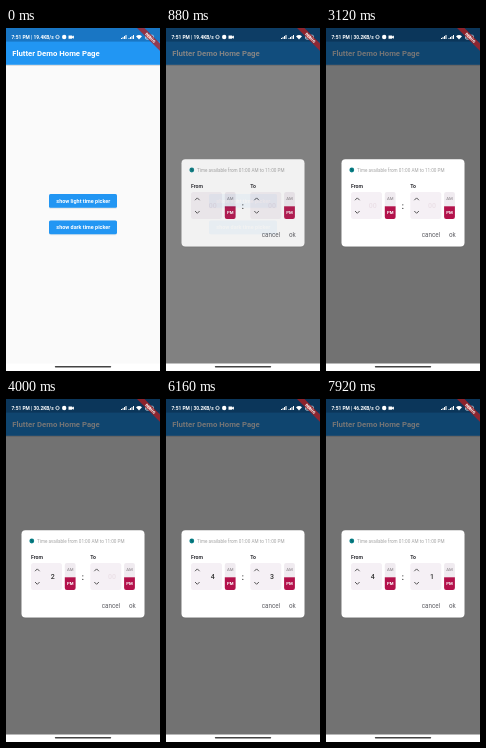
These frames come from a looping animation (154x343 px, 8000 ms). An HTML page:

```html
<!DOCTYPE html>
<html lang="en">
<head>
<meta charset="utf-8">
<title>Time picker demo</title>
<style>
  html, body { margin: 0; width: 100%; height: 100%; overflow: hidden; background: #fafafa; }
  svg { display: block; width: 100vw; height: 100vh; font-family: Roboto, "Noto Sans", sans-serif; }
  .status { fill: #fff; font-size: 4.85px; font-weight: 700; }
  .title { fill: #fff; font-size: 7.75px; font-weight: 700; }
  .button { fill: #2196f3; }
  .label { fill: #fff; font-size: 5.45px; font-weight: 700; text-anchor: middle; }
  .note { fill: #a3a3a3; font-size: 4.63px; }
  .head { fill: #303036; font-size: 5.2px; font-weight: 700; }
  .digit { fill: #333; font-size: 7px; font-weight: 500; text-anchor: middle; }
  .digit.hint { fill: #eadfe6; }
  .half { font-size: 4.3px; text-anchor: middle; }
  .action { fill: #606066; font-size: 6.3px; }
  .line { fill: none; stroke: #444; stroke-width: .9; }
  .banner { font-size: 3.9px; font-weight: 900; fill: #fff; text-anchor: middle; }
</style>
</head>
<body>
<svg viewBox="0 0 154 343" preserveAspectRatio="none">
  <defs>
    <linearGradient id="shade" x2="0" y2="1">
      <stop stop-color="#000" stop-opacity=".2"/>
      <stop offset="1" stop-color="#000" stop-opacity="0"/>
    </linearGradient>
    <filter id="lift" x="-20%" y="-40%" width="140%" height="200%">
      <feDropShadow dx="0" dy=".4" stdDeviation=".4" flood-opacity=".2"/>
    </filter>
    <clipPath id="column"><rect x="58.8" y="164" width="10.8" height="27" rx="2"/></clipPath>
    <g id="picker">
      <rect x="25" y="164" width="31" height="27" rx="2.5" fill="#f5f0f5"/>
      <path class="line" d="M29 172.2l2.3-2.3 2.3 2.3M29 183l2.3 2.3 2.3-2.3"/>
      <g clip-path="url(#column)">
        <rect x="58" y="164" width="12" height="15" fill="#f0ebf0"/>
        <rect x="58" y="178.3" width="12" height="13" fill="#b3124b"/>
      </g>
      <text class="half" x="64.2" y="172.2" fill="#8a858a">AM</text>
      <text class="half" x="64.2" y="186.4" fill="#fff" font-weight="700">PM</text>
    </g>
  </defs>

  <rect width="154" height="343" fill="#fafafa"/>
  <rect y="36.8" width="154" height="1.6" fill="url(#shade)"/>
  <rect width="154" height="36.8" fill="#2196f3"/>
  <rect width="154" height="13.6" fill="#1976c4"/>
  <text class="title" x="6.2" y="28.2">Flutter Demo Home Page</text>
  <g filter="url(#lift)">
    <rect class="button" x="43" y="166" width="68" height="13.8" rx="1.6"/>
    <rect class="button" x="43" y="192.4" width="68" height="13.8" rx="1.6"/>
  </g>
  <text class="label" x="77.3" y="174.8">show light time picker</text>
  <text class="label" x="77.3" y="201.2">show dark time picker</text>

  <rect id="barrier" width="154" height="336" opacity="0"/>

  <g id="dialog" opacity="0">
    <rect x="15.5" y="131.3" width="123" height="87.3" rx="4" fill="#fff" filter="url(#lift)"/>
    <circle cx="25.8" cy="142" r="2.4" fill="#087f86"/>
    <path d="M25.8 140.6V142.1l1 .7" fill="none" stroke="#034a50" stroke-width=".6"/>
    <text class="note" x="31" y="143.5">Time available from 01:00 AM to 11:00 PM</text>
    <text class="head" x="25" y="159.8">From</text>
    <text class="head" x="84.3" y="159.8">To</text>
    <use href="#picker"/>
    <use href="#picker" x="59.3"/>
    <text id="from" class="digit" x="46.7" y="180.1"></text>
    <text id="to" class="digit" x="106" y="180.1"></text>
    <circle cx="76.8" cy="176.8" r=".65" fill="#444"/>
    <circle cx="76.8" cy="180.4" r=".65" fill="#444"/>
    <text class="action" x="95.7" y="209.1">cancel</text>
    <text class="action" x="123" y="209.1">ok</text>
  </g>

  <g class="status">
    <text id="status" x="5.5" y="10.8"></text>
    <circle cx="51.5" cy="9" r="1.7" fill="none" stroke="#fff" stroke-width=".8"/>
    <circle cx="58.2" cy="9" r="2.2"/>
    <path d="M62.5 7.5h3.7v1l1.7-1v3.2l-1.7-1v1h-3.7z"/>
    <path d="M115 11v-1h1v1zM116.5 11v-2h1v2zM118 11V8h1v3zM119.5 11V7h1v4z"/>
    <path d="M122.5 11v-1h1v1zM124 11v-2h1v2zM125.5 11V8h1v3zM127 11V7h1v4z"/>
    <path d="M130 8.2q3-2.6 6 0L133 11.4z"/>
    <rect x="139.5" y="7.2" width="8" height="4" rx="1.2" fill="none" stroke="#fff" stroke-width=".6"/>
    <rect x="140.5" y="8.1" width="4.5" height="2.2" rx=".5"/>
  </g>

  <g transform="translate(154 0) rotate(45)">
    <rect x="-16" y="11" width="32" height="5.2" fill="#b71c1c" fill-opacity=".75"/>
    <text class="banner" y="15">DEBUG</text>
  </g>

  <rect y="335.5" width="154" height="7.5" fill="#fff"/>
  <rect x="48.8" y="338" width="56.4" height="1.5" rx=".75" fill="#444"/>
</svg>
<script>
  const LOOP = 8000, STEP = 80;
  const get = id => document.getElementById(id);

  // Each track is a list of [start time, value].
  const tracks = {
    fade: [[0, 0], [800, .45], [880, .9], [960, 1]],
    speed: [[0, '19.4'], [2480, '30.2'], [6960, '46.2']],
    from: [[0, '00'], [3440, '1'], [3760, '2'], [4080, '3'], [4400, '4']],
    to: [[0, '00'], [5200, '1'], [5520, '2'], [5840, '3'], [6720, '2'], [7280, '1']]
  };
  const at = (name, t) => tracks[name].filter(([start]) => start <= t).pop()[1];

  function setDigit(id, t) {
    const value = at(id, t);
    get(id).textContent = value;
    get(id).classList.toggle('hint', value === '00');
  }

  function draw() {
    const t = Math.floor(performance.now() % LOOP / STEP) * STEP;
    const fade = at('fade', t);
    get('barrier').setAttribute('opacity', .54 * fade);
    get('dialog').setAttribute('opacity', fade);
    get('status').textContent = `7:51 PM | ${at('speed', t)}KB/s`;
    setDigit('from', t);
    setDigit('to', t);
    requestAnimationFrame(draw);
  }
  draw();
</script>
</body>
</html>
```
